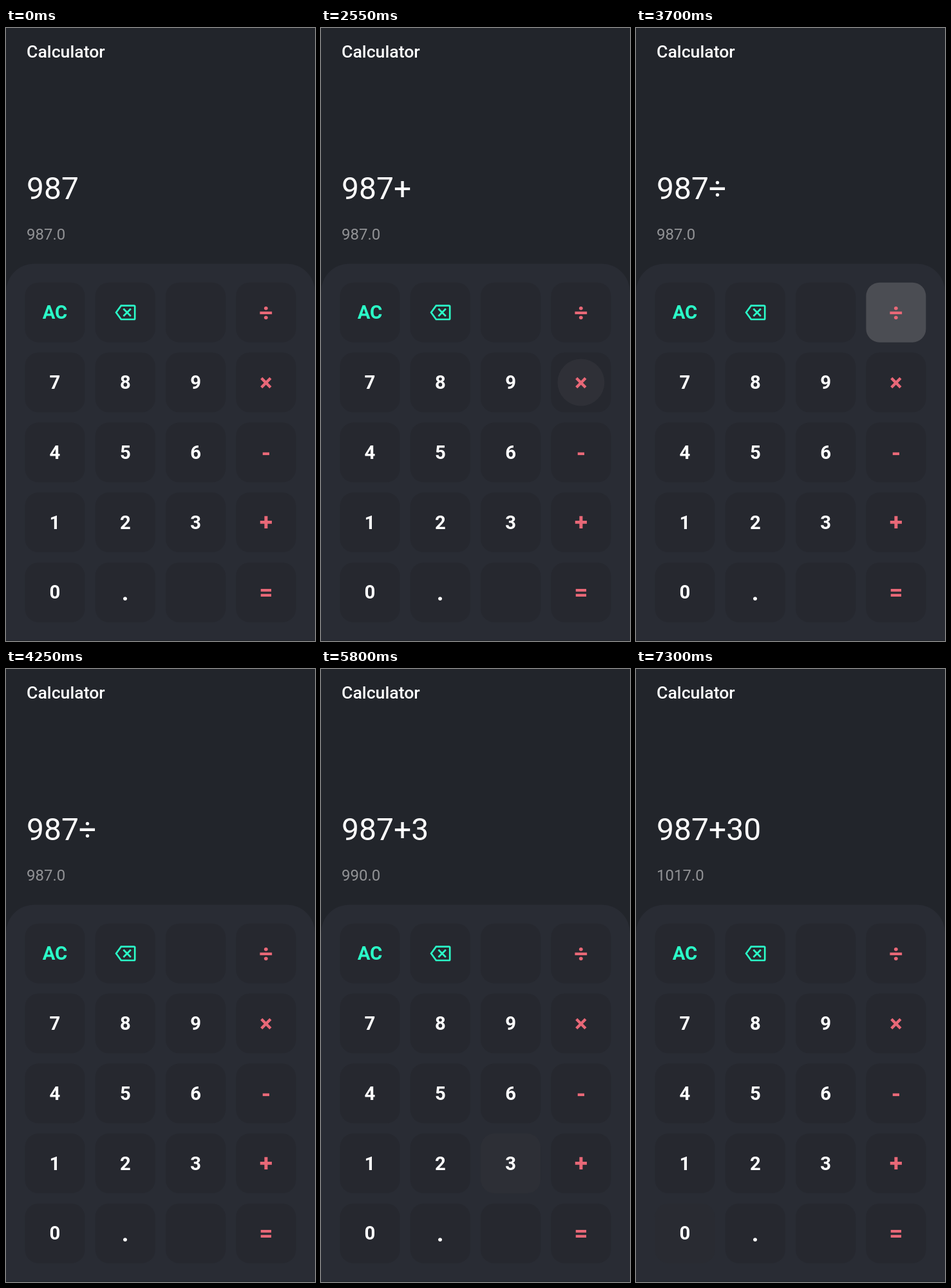
An HTML page for the animation above (8000 ms loop, 480x953 px).

```html
<!DOCTYPE html>
<html lang="en">
<head>
<meta charset="utf-8">
<title>Calculator</title>
<style>
  html, body { margin: 0; height: 100%; overflow: hidden; background: #22252b; }
  svg { display: block; width: 100vw; height: 100vh; font-family: Roboto, sans-serif; fill: #fff; }
  .key { fill: #26282f; }
  .label { font-size: 29.33px; font-weight: 700; text-anchor: middle; }
  .big { font-size: 37.33px; }
  .op { fill: #e86877; }
  .ac { fill: #2bffc8; }
  .bold { font-weight: 700; }
</style>
</head>
<body>
<svg id="stage" viewBox="0 0 480 953">
  <rect width="480" height="953" fill="#22252b"/>
  <text x="32" y="46" font-size="26.67" font-weight="500">Calculator</text>
  <text id="input" x="32" y="265.5" font-size="48"></text>
  <text id="result" x="32" y="329" font-size="24" fill="#929396"></text>
  <path d="M0 952V410.500A44 44 0 0 1 44 366.500H436A44 44 0 0 1 480 410.500V952Z" fill="#292c34"/>
  <g id="keys"></g>
  <path transform="translate(169.500 426.300) scale(1.3333)" fill="none" stroke="#2bffc8" stroke-width="2"
    d="M7 4H22a1 1 0 0 1 1 1V19a1 1 0 0 1-1 1H7L1.200 12Z M9.700 7.700l8.600 8.600M18.300 7.700l-8.600 8.600"/>
</svg>
<script>
const LOOP = 8000, STEP = 50, PEAK = 0.2, SIZE = 93, RADIUS = 21;
const $ = id => document.getElementById(id);
const labels = ['AC', '', '', '÷', '7', '8', '9', '×', '4', '5', '6', '-', '1', '2', '3', '+', '0', '.', '', '='];

// start of press, fully lit, fade begins, fade ends, faint glow left until a given time
const presses = [
  { key: '+', start: 1000, lit: 1250, fade: 1400, end: 1550, input: '987+' },
  { key: '×', start: 2550, lit: 2750, fade: 2800, end: 2950, input: '987×' },
  { key: '÷', start: 3450, lit: 3650, fade: 3700, end: 3850, input: '987÷' },
  { key: '+', start: 4550, lit: 4700, fade: 4700, end: 4850, input: '987+' },
  { key: '3', start: 5450, lit: 5600, fade: 5650, end: 5800, input: '987+3', result: '990.0', rest: 0.033, until: 7000 },
  { key: '0', start: 7000, lit: 7050, fade: 7200, end: 7300, input: '987+30', result: '1017.0', rest: 0.014, until: LOOP }
];

function add(parent, name, attrs, text = '') {
  const el = document.createElementNS('http://www.w3.org/2000/svg', name);
  for (const a in attrs) el.setAttribute(a, attrs[a]);
  el.textContent = text;
  return parent.appendChild(el);
}

const glow = {};
labels.forEach((label, i) => {
  const col = i % 4, row = i >> 2;
  const x = 29.5 + col * 109.3, y = 395.7 + row * 108.8;
  const cx = x + SIZE / 2, cy = y + SIZE / 2;
  const box = { x, y, width: SIZE, height: SIZE, rx: RADIUS };
  const g = add($('keys'), 'g', {});
  add(g, 'rect', { ...box, class: 'key' });
  if (presses.some(p => p.key === label)) {
    add(add(g, 'clipPath', { id: 'clip' + i }), 'rect', box);
    glow[label] = add(g, 'circle', { cx, cy, r: 0, 'clip-path': `url(#clip${i})` });
  }
  const big = col === 3 || label === '.';
  const style = col === 3 ? 'label big op' : label === 'AC' ? 'label ac' : big ? 'label big' : 'label';
  add(g, 'text', { x: cx, y: cy + (big ? 12.7 : 10), class: style }, label);
});

function light(p, t) {
  if (t < p.start) return 0;
  if (t < p.lit) return PEAK * (t - p.start + STEP) / (p.lit - p.start + STEP);
  if (t < p.fade) return PEAK;
  if (t < p.end) return PEAK * (p.end - t) / (p.end - p.fade + 25);
  return t < p.until ? p.rest : 0;
}

let shown;
function draw(now) {
  const t = Math.floor(now % LOOP / STEP) * STEP;
  let input = '987', result = '987.0';
  for (const key in glow) glow[key].setAttribute('opacity', 0);
  for (const p of presses) {
    if (t >= p.start + STEP) {
      input = p.input;
      result = p.result || result;
    }
    const alpha = light(p, t);
    if (alpha) {
      const grow = Math.min(1, (t - p.start + STEP) / (p.lit - p.start));
      glow[p.key].setAttribute('opacity', alpha);
      glow[p.key].setAttribute('r', 26 + 42 * grow);
    }
  }
  if (input !== shown) {
    shown = input;
    $('input').textContent = '';
    for (const part of input.split(/(×)/))
      add($('input'), 'tspan', part === '×' ? { class: 'bold' } : {}, part);
  }
  $('result').textContent = result;
}

const begin = performance.now();
function tick() {
  draw(performance.now() - begin);
  requestAnimationFrame(tick);
}
tick();
</script>
</body>
</html>
```
